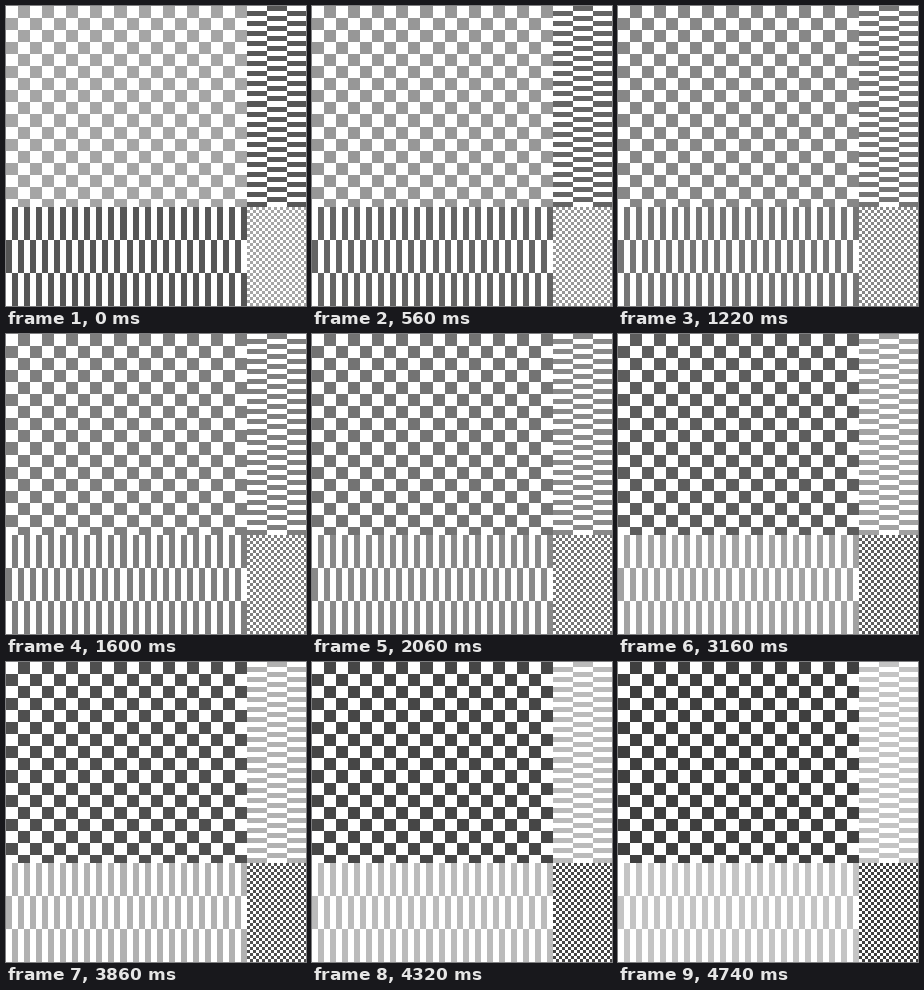
These frames come from a looping animation (300 by 300 pixels, 4800 ms). An HTML page with a canvas:

```html
<!DOCTYPE html>
<html lang="en">
<head>
<meta charset="utf-8">
<title>Shifting checks</title>
<style>
  html, body { margin: 0; width: 100%; height: 100%; overflow: hidden; background: #fff; }
  canvas { display: block; }
</style>
</head>
<body>
<canvas id="stage" width="300" height="300"></canvas>
<script>
const ctx = document.getElementById('stage').getContext('2d');
const LOOP = 4800, STEPS = 103;
const SPLIT_X = 241, SPLIT_Y = 201, SIZE = 300;

// Checkerboard of cw x ch cells, white first, clipped to its region.
function checks(left, top, right, bottom, cw, ch, gray) {
  ctx.fillStyle = `rgb(${gray},${gray},${gray})`;
  for (let row = 0; top + Math.round(row * ch) < bottom; row++) {
    const y = top + Math.round(row * ch);
    const y2 = Math.min(bottom, top + Math.round((row + 1) * ch));
    for (let col = 1 - row % 2; left + Math.round(col * cw) < right; col += 2) {
      const x = left + Math.round(col * cw);
      const x2 = Math.min(right, left + Math.round((col + 1) * cw));
      ctx.fillRect(x, y, x2 - x, y2 - y);
    }
  }
}

function draw(now) {
  const step = Math.floor((now % LOOP) / LOOP * STEPS);
  const t = step * LOOP / STEPS / 1000;
  const darkening = Math.round(165 - 26 * t + 0.9 * t * t);
  const lightening = Math.round(86 + 26 * t - 0.55 * t * t);

  ctx.fillStyle = '#fff';
  ctx.fillRect(0, 0, SIZE, SIZE);
  checks(0, 0, SPLIT_X, SPLIT_Y, 12.05, 12.05, darkening);
  checks(SPLIT_X, SPLIT_Y, SIZE, SIZE, 3.0125, 3.0125, darkening);
  checks(SPLIT_X, 0, SIZE, SPLIT_Y, 20, 5.025, lightening);
  checks(0, SPLIT_Y, SPLIT_X, SIZE, 6.025, 33, lightening);
}

function tick() {
  draw(performance.now());
  requestAnimationFrame(tick);
}
tick();
</script>
</body>
</html>
```
